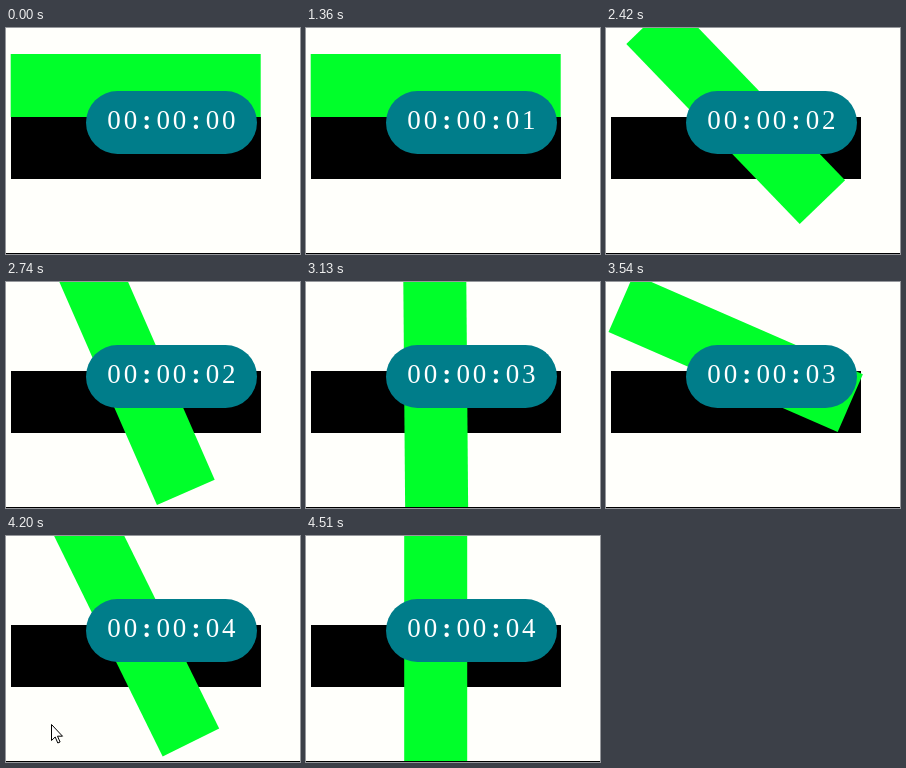
An HTML page for the animation above (8.59 s loop, 294 by 226 pixels).

```html
<!DOCTYPE html>
<html lang="en">
<head>
<meta charset="utf-8">
<title>Rotating bar with timer</title>
<style>
  html, body { margin: 0; width: 100%; height: 100%; overflow: hidden; background: #fffffb; }
  svg { display: block; }
  text { font: 27px "Liberation Serif", "Times New Roman", serif; fill: #fff; text-anchor: middle; }
  .colon { font-weight: bold; }
</style>
</head>
<body>
<svg width="294" height="226" viewBox="0 0 294 226">
  <rect width="294" height="226" fill="#fffffb"/>
  <rect x="5" y="89" width="250" height="62"/>
  <rect id="bar" x="-125" y="-31.5" width="250" height="63" fill="#00ff2a"/>
  <rect y="225" width="294" height="1"/>
  <rect x="80" y="63" width="171" height="63" rx="31.5" fill="#007d8a"/>
  <g id="clock"></g>
  <path id="cursor" d="M45.5 188.5v16l3.7-3.5 2.6 6 2.3-1-2.6-5.8h5z" fill="#fff" stroke="#000"/>
</svg>
<script>
const LOOP = 8590;
const bar = document.getElementById('bar');
const clock = document.getElementById('clock');
const cursor = document.getElementById('cursor');

// Two turns: [time in ms, angle in degrees]
const turns = [
  [[1910, 14], [2120, 27], [2740, 66.3], [3130, 89.5], [3145, 90]],
  [[3145, 0], [3930, 46.7], [4490, 82]]
];
const ticks = [1360, 1910, 2910, 3900];

const glyphs = [...'00:00:00'].map((char, i) => {
  const glyph = document.createElementNS('http://www.w3.org/2000/svg', 'text');
  glyph.setAttribute('x', 108 + 16.4 * i);
  glyph.setAttribute('y', 100.5);
  if (char === ':') glyph.setAttribute('class', 'colon');
  glyph.textContent = char;
  return clock.appendChild(glyph);
});

function interpolate(keys, t) {
  for (let i = 1; i < keys.length; i++) {
    const [t0, a0] = keys[i - 1], [t1, a1] = keys[i];
    if (t < t1) return a0 + (a1 - a0) * (t - t0) / (t1 - t0);
  }
  return keys[keys.length - 1][1];
}

function angleAt(t) {
  if (t < 1910) return 0;
  if (t >= 4510) return 90;
  return interpolate(turns[t < 3145 ? 0 : 1], t);
}

function render(t) {
  const angle = angleAt(t);
  // The bar sinks over a quarter turn while it rotates
  const y = 57.5 + 52 * angle / 90;
  bar.setAttribute('transform', `translate(129.7 ${y}) rotate(${angle})`);
  glyphs[7].textContent = ticks.filter(tick => t >= tick).length;
  cursor.style.display = t >= 3700 && t < 4250 ? '' : 'none';
}

const start = performance.now();
function frame() {
  render((performance.now() - start) % LOOP);
  requestAnimationFrame(frame);
}
frame();
</script>
</body>
</html>
```
